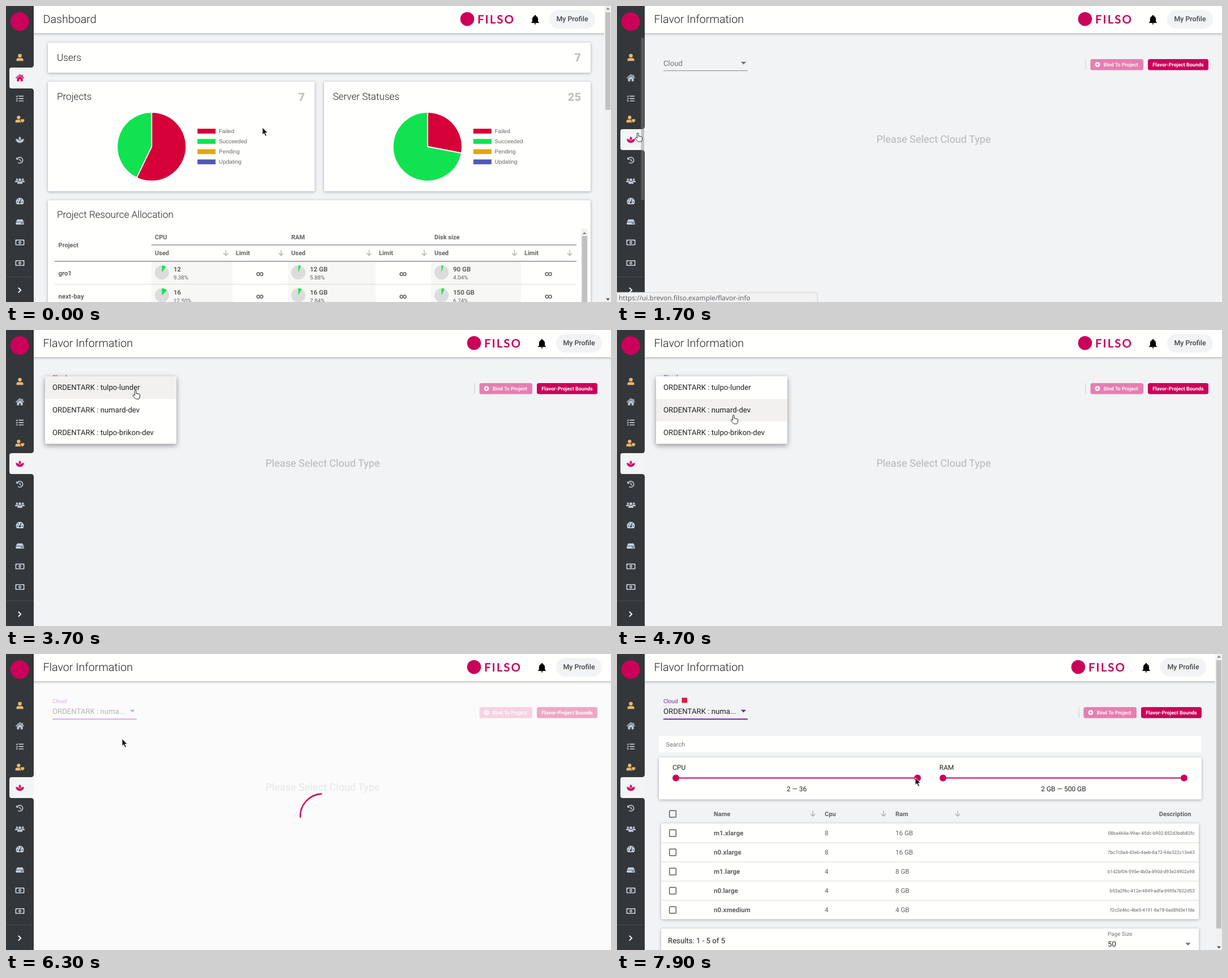
An HTML page that plays this animation: 1069x524 px, repeating every 8 s.

```html
<!DOCTYPE html>
<html lang="en">
<head>
<meta charset="utf-8">
<title>Dashboard</title>
<style>
html, body { margin: 0; width: 100%; height: 100%; overflow: hidden; background: #f1f3f5; }
svg { display: block; width: 100vw; height: 100vh; font-family: Roboto, sans-serif; text-rendering: geometricPrecision; }
.card { fill: #fffffe; filter: drop-shadow(0 1.5px 2.5px rgba(0,0,0,.32)); }
.menu { fill: #fffffe; filter: drop-shadow(0 3px 5px rgba(0,0,0,.4)); }
.line { fill: none; stroke-width: 1.3; }

/* 1% = 80 ms */
#cursor { animation: cursor 8s -1ms step-end infinite; }
@keyframes cursor {
  0% { transform: translate(453px,215px); }
  5% { transform: translate(413px,215px); }
  6.25% { transform: translate(413px,215px); animation-timing-function: steps(5); }
  12.5% { transform: translate(65px,222px); }
  15% { transform: translate(31px,224px); }
  26.25% { transform: translate(31px,224px); animation-timing-function: steps(4); }
  31.25% { transform: translate(95px,204px); animation-timing-function: steps(5); }
  37.5% { transform: translate(223px,106px); }
  48.75% { transform: translate(223px,106px); animation-timing-function: steps(4); }
  53.75% { transform: translate(92px,167px); animation-timing-function: steps(4); }
  58.75% { transform: translate(200px,150px); }
  68.75% { transform: translate(205px,150px); }
  87.5% { transform: translate(206px,150px); animation-timing-function: steps(5); }
  93.75% { transform: translate(590px,268px); animation-timing-function: steps(3); }
  97.5% { transform: translate(530px,216px); }
  98.75%, 100% { transform: translate(527px,219px); }
}
#tools { animation: tools 8s -1ms step-end infinite; }
@keyframes tools {
  0%, 80%, 100% { transform: none; }
  21.25% { transform: translateX(12px); }
}
#label { animation: label 8s -1ms step-end infinite; }
@keyframes label {
  0% { transform: translate(82px,106px); fill: #757575; }
  37.5% { transform: translate(82px,106px); fill: #757575; animation-timing-function: steps(2); }
  40%, 100% { transform: translate(82px,87px) scale(.75); fill: #7b1fa2; }
}
#menu { transform-origin: 185px 142px; animation: menu 8s -1ms step-end infinite; }
@keyframes menu {
  0% { opacity: 0; transform: scale(.75,.56); }
  37.5% { opacity: 0; transform: scale(.75,.56); animation-timing-function: steps(4); }
  42.5% { opacity: 1; transform: none; }
  67.5% { opacity: 1; transform: none; animation-timing-function: steps(3); }
  71.25%, 100% { opacity: 0; transform: none; }
}
#veil { animation: veil 8s -1ms step-end infinite; }
@keyframes veil {
  0% { opacity: 0; }
  67.5% { opacity: 0; animation-timing-function: steps(2); }
  70% { opacity: .66; }
  78.75% { opacity: .66; animation-timing-function: steps(4); }
  83.75%, 100% { opacity: 0; }
}
#spinner { transform-origin: 559.5px 287px; animation: spin 1s -1ms steps(10) infinite; }
@keyframes spin { to { transform: rotate(360deg); } }
</style>
</head>
<body>
<svg id="stage" viewBox="0 0 1069 524"></svg>
<script>
const BRAND = '#ca0059', GREY = '#616161', ICON = '#c3ced8', GOLD = '#e9b66f';
const GREEN = '#11e24f', RED = '#d40037', PURPLE = '#7b1fa2';
const rules = new Map();

const rect = (x, y, w, h, fill, r = 0) =>
  `<rect x="${x}" y="${y}" width="${w}" height="${h}" rx="${r}" fill="${fill}"/>`;
const card = (x, y, w, h, cls = 'card') =>
  `<rect class="${cls}" x="${x}" y="${y}" width="${w}" height="${h}" rx="2"/>`;
const dot = (x, y, r, fill) => `<circle cx="${x}" cy="${y}" r="${r}" fill="${fill}"/>`;
const path = (d, fill) => `<path d="${d}" fill="${fill}"/>`;
const stroke = (d, color, w = 1.3) =>
  `<path class="line" d="${d}" stroke="${color}" style="stroke-width:${w}"/>`;
const at = (x, y, body) => `<g transform="translate(${x} ${y})">${body}</g>`;
const text = (x, y, s, size, fill = GREY, weight = 400, anchor = 'start', extra = '') =>
  `<text x="${x}" y="${y}" font-size="${size}" fill="${fill}" font-weight="${weight}" text-anchor="${anchor}" ${extra}>${s}</text>`;

// Shows a group only between two times (ms) of the loop.
function on(from, to, body) {
  const name = `on${from}-${to}`;
  rules.set(name, `@keyframes ${name}{0%{opacity:0}${from / 80}%{opacity:1}${to / 80}%{opacity:0}}`);
  return `<g style="animation:${name} 8s -1ms step-end infinite">${body}</g>`;
}

function wedge(cx, cy, r, from, to, fill, edge = 0) {
  const p = f => {
    const a = (f - .25) * 2 * Math.PI;
    return `${(cx + r * Math.cos(a)).toFixed(2)} ${(cy + r * Math.sin(a)).toFixed(2)}`;
  };
  return `<path d="M${cx} ${cy}L${p(from)}A${r} ${r} 0 ${to - from > .5 ? 1 : 0} 1 ${p(to)}Z" fill="${fill}" stroke="#fff" stroke-width="${edge}"/>`;
}

const down = (x, y) => at(x, y, stroke('M0-5V4.5M-4.3 .5L0 4.7L4.3 .5', '#a8a8a8', 1.2));
const caret = (x, y, fill) => path(`M${x - 4.7} ${y - 2.2}h9.4l-4.7 4.7z`, fill);

function scrollbar(thumb) {
  return rect(1057, 0, 12, 524, '#f1f1f1') + rect(1059, 11, 9, thumb, '#c1c1c1') +
    path('M1060 6.5h7l-3.5-4z', '#8a8a8a') + path('M1060 517.5h7l-3.5 4z', '#505050');
}

function chart(cx, share) {
  const names = ['Failed', 'Succeeded', 'Pending', 'Updating'];
  const colors = [RED, GREEN, '#e4a511', '#5058ba'];
  return wedge(cx, 249, 61, 0, share, RED, 1.8) + wedge(cx, 249, 61, share, 1, GREEN, 1.8) +
    names.map((s, i) => rect(cx + 81, 217.3 + i * 18.1, 32, 8.6, colors[i]) +
      text(cx + 118.7, 225 + i * 18.1, s, 10, '#666', 400, 'start',
        'font-family="Liberation Sans, sans-serif"')).join('');
}

function dashboard() {
  const title = (x, y, s) => text(x, y, s, 17.1, '#212121', 300);
  const count = (x, y, s) => text(x, y, s, 20, '#c0c0c0', 900, 'end');
  const bold = (x, y, s, size = 11) => text(x, y, s, size, GREY, 700);
  const cols = [
    { name: 'CPU', x: 257, end: 400, limit: 406, tip: 486, rows: [['12', 9.38], ['16', 12.5]] },
    { name: 'RAM', x: 498, end: 653, limit: 659, tip: 739, rows: [['12 GB', 5.88], ['16 GB', 7.84]] },
    { name: 'Disk size', x: 751, end: 910, limit: 916, tip: 996, rows: [['90 GB', 4.04], ['150 GB', 6.74]] }
  ];
  let out = card(74, 65, 959, 53) + title(90, 97, 'Users') + count(1016, 98, 7) +
    card(74, 134, 471.5, 194) + title(90, 166, 'Projects') + count(528, 167.5, 7) +
    card(562, 134, 471, 194) + title(577.5, 166, 'Server Statuses') + count(1016, 167.5, 25) +
    chart(257.3, 4 / 7) + chart(744.8, 7 / 25) +
    on(700, 900, wedge(257.3, 249, 61, 0, 4 / 7, '#b0002d', 1.8)) +
    card(74, 344, 959, 200) + title(90, 375, 'Project Resource Allocation') +
    bold(92.5, 426.5, 'Project');
  for (const c of cols) {
    out += rect(c.x, 453, c.end - c.x, 71, '#f7f7f6') + bold(c.x + 6, 412.5, c.name) +
      bold(c.x + 6, 441.3, 'Used') + bold(c.limit, 441.3, 'Limit') +
      down(c.end - 11.5, 437) + down(c.tip, 437);
    c.rows.forEach(([value, pct], i) => {
      const y = 471.7 + i * 40.5;
      out += dot(c.x + 18.5, y, 12.5, '#dcdcdc') +
        wedge(c.x + 18.5, y, 12.5, 0, pct / 100, GREEN) +
        bold(c.x + 39, y - 1.5, value, 11.5) +
        text(c.x + 39, y + 12.6, pct.toFixed(2) + '%', 9.8) +
        text(c.limit + 42.5, y + 6, '∞', 13, GREY, 700, 'middle');
    });
  }
  return out + bold(92.5, 477, 'gro1', 11.5) + bold(92.5, 517.5, 'next-bay', 11.5) +
    stroke('M257 423H1008M86 452H1008', '#8c8c8c', 1.5) + stroke('M86 492.5H1008', '#dcdcdc', 1) +
    rect(1016, 394, 12, 130, '#f1f1f1') + rect(1017.5, 407, 9.5, 117, '#c1c1c1') +
    path('M1018.5 404h7l-3.5-4z', '#8a8a8a') + scrollbar(173);
}

const buttons = () =>
  stroke('M816 94V113', '#ccc', 1) + rect(824.5, 94, 93.5, 19.5, '#e47fb1', 3.5) +
  dot(837, 103.6, 4.4, '#fff') + stroke('M834.5 103.6h5M837 101.1v5', '#e47fb1', 1.3) +
  text(847.7, 107, 'Bind To Project', 9, '#fdf0f6', 700) +
  rect(926, 94, 107, 19.5, BRAND, 3.5) +
  text(979.5, 107, 'Flavor-Project Bounds', 9, '#fff', 700, 'middle');

const chosen = () => text(82, 106, 'ORDENTARK : numa...', 13.2, '#212121');
const focus = () => caret(223.5, 101, PURPLE) + rect(82, 114.3, 149, 2, PURPLE);
const label = () => '<text id="label" font-size="13.2">Cloud</text>';

function picker() {
  const options = ['tulpo-lunder', 'numard-dev', 'tulpo-brikon-dev'];
  return at(12, 0, buttons()) +
    on(0, 3100, caret(223.5, 101, '#6e6e6e') + rect(82, 114, 149, 1, '#8a8a8a')) +
    on(3100, 8000, focus()) + on(5500, 8000, chosen()) +
    text(559.5, 242, 'Please Select Cloud Type', 18.1, '#b5b7b8', 400, 'middle') + label() +
    `<g id="menu">${card(69, 82, 232, 119.5, 'menu')}` +
    on(0, 4200, rect(69, 82, 232, 40, '#f2f1f0', 2)) + on(4500, 8000, rect(69, 122, 232, 39.5, '#f2f1f0')) +
    options.map((s, i) => text(82, 106 + i * 39.8, 'ORDENTARK : ' + s, 13.2, '#212121')).join('') + '</g>';
}

function flavors() {
  const rows = [
    ['m1.xlarge', 8, 16, '08ba464a-99ac-45dc-b902-852d3bdb82fc'],
    ['n0.xlarge', 8, 16, '7bc7c0a4-43eb-4aeb-8a72-94e322c13e43'],
    ['m1.large', 4, 8, 'b1d2bf06-595e-4b0a-890d-d93e24902a98'],
    ['n0.large', 4, 8, 'b53a2f6c-412e-4849-adfa-b99fa7822d53'],
    ['n0.xmedium', 4, 4, 'f2c2e46c-4be5-4191-8a78-6ad8fd3e1fda']
  ];
  const box = y => `<rect x="92.7" y="${y - 5.7}" width="11.6" height="11.6" rx="1" fill="none" stroke="#5c5c5c" stroke-width="1.5"/>`;
  const slider = (x, a, b, name, range) =>
    text(x, 205, name, 12, '#212121') + rect(a, 218.5, b - a, 2, BRAND) +
    dot(a, 219.5, 6, BRAND) + dot(b, 219.5, 6, BRAND) +
    text((a + b) / 2, 243, range, 12, '#212121', 400, 'middle');
  const head = (x, s, anchor) => text(x, 287, s, 11, GREY, 700, anchor);
  return buttons() + focus() + chosen() +
    text(82, 87, 'Cloud', 9.9, PURPLE) + rect(114.5, 77.5, 9.5, 9, '#e0183c') +
    rect(74, 145, 958, 29, '#fffffe') + text(86.5, 163.5, 'Search', 11, '#757575') +
    card(74, 183, 959, 74.5) + slider(98, 104, 531, 'CPU', '2 — 36') +
    slider(569.5, 576, 1002, 'RAM', '2 GB — 500 GB') +
    box(283) + head(171, 'Name') + head(367, 'Cpu') + head(492, 'Ram') + head(1014.5, 'Description', 'end') +
    [346, 471, 602].map(x => down(x, 282.5)).join('') + card(78, 300, 950, 169.5) +
    rows.map(([name, cpu, ram, id], i) => {
      const y = 317 + i * 34;
      return box(y) + text(171, y + 4, name, 11.6, GREY, 700) + text(367, y + 4, cpu, 11.6) +
        text(492, y + 4, ram + ' GB', 11.6) + text(1020.5, y + 2.6, id, 8.2, GREY, 400, 'end') +
        (i ? rect(78, y - 17.5, 950, 1, '#d9d9d9') : '');
    }).join('') +
    card(78, 486, 950, 60) + text(90, 512.3, 'Results: 1 - 5 of 5', 13.2, '#212121') +
    text(867, 498.5, 'Page Size', 10, '#757575') + text(867, 518.3, '50', 13.2, '#212121') +
    caret(1009, 513.5, '#757575') + scrollbar(475);
}

function header() {
  const title = s => text(65.5, 30, s, 19.7, '#212121', 300);
  return '<rect class="card" x="40" y="-10" width="1040" height="58"/>' +
    on(0, 1700, title('Dashboard')) + on(1700, 8000, title('Flavor Information')) +
    `<g id="tools">${dot(815, 23, 12.3, BRAND)}` +
    text(833, 31, 'FILSO', 20.5, BRAND, 700, 'start', 'font-family="Lato, sans-serif" letter-spacing="2"') +
    '<path transform="translate(924.8 13.8) scale(.85)" d="M12 22c1.1 0 2-.9 2-2h-4c0 1.1.9 2 2 2zm6-6v-5c0-3.07-1.63-5.64-4.5-6.32V4c0-.83-.67-1.5-1.5-1.5s-1.5.67-1.5 1.5v.68C7.64 5.36 6 7.92 6 11v5l-2 2v1h16v-1l-2-2z"/>' +
    rect(960, 7, 81, 33, '#f1f3f5', 16.5) +
    text(1000.5, 27.4, 'My Profile', 12.4, '#454545', 500, 'middle') + '</g>' +
    on(0, 1700, scrollbar(173)) + on(6400, 8000, scrollbar(475));
}

const DARK = '#33373a';
const person = (x, y, k, c) =>
  `<g transform="translate(${x} ${y}) scale(${k})">${dot(0, -3, 3.3, c)}${path('M-6 6.3V4.5Q-6 1.2-3 1.2H3Q6 1.2 6 4.5V6.3Z', c)}</g>`;
const icons = {
  user: c => person(0, 0, 1, c),
  home: c => stroke('M-7 .3L0-5.6L7 .3', c, 1.7) + path('M-5 1L0-3.3L5 1V6H1.4V2.2H-1.4V6H-5ZM3.4-5.6H5.2V-1H3.4Z', c),
  list: c => stroke('M-2-4.2H6.5M-2 0H6.5M-2 4.2H6.5', c, 1.7) + stroke('M-6.7-4.2l1.2 1.2 2-2.4M-6.7 0l1.2 1.2 2-2.4', c, 1.2) + dot(-5.2, 4.2, 1.2, c),
  guard: c => person(-2.2, 0, .95, c) + path('M4.5-1.5L9 0Q9 5 4.5 7.2Q0 5 0 0Z', DARK) + path('M4.5-.3L8 .9Q8 4.5 4.5 6.2Q1.2 4.5 1.2 .9Z', c),
  lotus: c => path('M0 5.7C-4.5 5.7-7.2 2.5-7.2-1.4C-4-1.2-1.2 .3 0 2.6C1.2 .3 4-1.2 7.2-1.4C7.2 2.5 4.5 5.7 0 5.7ZM0-5.6C2.2-3.6 3-1.6 0 1.2C-3-1.6-2.2-3.6 0-5.6Z', c),
  history: c => stroke('M-4.3-3A5.2 5.2 0 1 1-3.4 4M0-2.6V.4L2.2 1.8', c, 1.6) + path('M-6.3-5.6V-.9H-1.6Z', c),
  team: c => person(-5.2, -.8, .55, c) + person(5.2, -.8, .55, c) + person(0, .4, .95, DARK) + person(0, .6, .75, c),
  gauge: c => path('M-5.4 5.2A7 7 0 1 1 5.4 5.2Z', c) + dot(0, 2, 1.7, DARK) + stroke('M0 2L2.2-4', DARK, 1.1) + dot(-4.3, 1.2, .9, DARK) + dot(4.3, 1.2, .9, DARK) + dot(-2.8, -2.6, .9, DARK),
  drive: c => path('M-4.5-4.5H4.5L7 -.3H-7Z', c) + rect(-7.2, .6, 14.4, 4.2, c, 1.2) + dot(2.6, 2.7, .9, DARK) + dot(5, 2.7, .9, DARK),
  cash: c => rect(-8, -5, 16, 10, c, 1) + rect(-6.3, -3.4, 12.6, 6.8, DARK, 1.5) + `<ellipse rx="2.3" ry="2.8" fill="${c}"/>` + rect(-.5, -1.5, 1, 3, DARK)
};

function sidebar() {
  const pill = y => path(`M49 ${y - 5}Q49 ${y} 44 ${y}H10Q6 ${y} 6 ${y + 4}V${y + 33}Q6 ${y + 37} 10 ${y + 37}H44Q49 ${y + 37} 49 ${y + 42}Z`, '#f2f4f6');
  const order = ['user', 'home', 'list', 'guard', 'lotus', 'history', 'team', 'gauge', 'drive', 'cash', 'cash'];
  const states = {
    home: [[0, 1700, BRAND], [1700, 8000, ICON]],
    lotus: [[0, 1200, ICON], [1200, 1300, '#c79db4'], [1300, 1700, '#d46a9c'], [1700, 8000, BRAND]]
  };
  return rect(0, 0, 49, 524, DARK) + on(0, 1700, pill(109)) + on(1700, 8000, pill(218)) +
    dot(24.3, 27.5, 16.5, BRAND) +
    order.map((name, i) => at(24.5, 91 + i * 36.4, states[name]
      ? states[name].map(([a, b, c]) => on(a, b, icons[name](c))).join('')
      : icons[name](i === 0 || i === 3 ? GOLD : ICON))).join('') +
    rect(0, 479, 49, 1, '#464b4e') + stroke('M21.8 498.6L26.2 503L21.8 507.4', '#fff', 1.9) +
    on(1200, 2300, rect(42.5, 56, 5.5, 288, 'rgba(135,135,135,.45)', 2.7));
}

function bubble(w) {
  return `<path d="M-1 507H${w - 3}Q${w} 507 ${w} 510V525H-1Z" fill="#f2f2f2" stroke="#cfcfcf"/>` +
    text(3, 520.8, 'https://ui.brevon.filso.example/flavor-info', 11.9, '#5f6368', 400, 'start', 'font-family="Noto Sans, sans-serif"');
}

function spinner() {
  const p = deg => {
    const a = deg * Math.PI / 180;
    return `${559.5 + 39.5 * Math.cos(a)} ${287 + 39.5 * Math.sin(a)}`;
  };
  return `<g id="spinner">${stroke(`M${p(68)}A39.5 39.5 0 0 1 ${p(160)}`, BRAND, 2.6)}</g>`;
}

function cursor() {
  const arrow = '<path d="M0 0V13.2L3 10.4L5.2 15.6L7.6 14.6L5.4 9.6H9.6Z" fill="#1c1c1c" stroke="#fff" stroke-width=".9"/>';
  const hand = '<path d="M4.5 9V2.2Q4.5 .7 5.8 .7T7.1 2.2V6.3L12 7.4Q14.2 8 13.8 10L13 14Q12.5 16.2 11 16.2H7.5Q6 16.2 5 14.7L1.5 10.7Q.7 9 2.2 8.6Q3.3 8.5 4.5 10Z" fill="#fff" stroke="#222"/>';
  const beam = stroke('M-2.5-6.2H-1Q0-6.2 0-5V5Q0 6.2-1 6.2H-2.5M2.5-6.2H1Q0-6.2 0-5M0 5Q0 6.2 1 6.2H2.5', '#222', 1);
  return `<g id="cursor">${[[0, 1200], [2300, 2900], [5500, 7000], [7200, 8000]].map(s => on(...s, arrow)).join('')}` +
    on(1200, 2300, hand) + on(2900, 5500, hand) + on(7000, 7200, beam) + '</g>';
}

const scene = rect(0, 0, 1069, 524, '#f1f3f5') +
  on(0, 1700, dashboard()) + on(1700, 6400, picker()) + on(6400, 8000, flavors()) +
  `<g id="veil">${rect(49, 48, 1020, 476, '#fffffd')}</g>` +
  on(5500, 6400, spinner()) + header() + sidebar() +
  on(1400, 1700, bubble(238)) + on(1700, 2800, bubble(354)) + cursor();

document.getElementById('stage').innerHTML = `<style>${[...rules.values()].join('')}</style>${scene}`;
</script>
</body>
</html>
```
